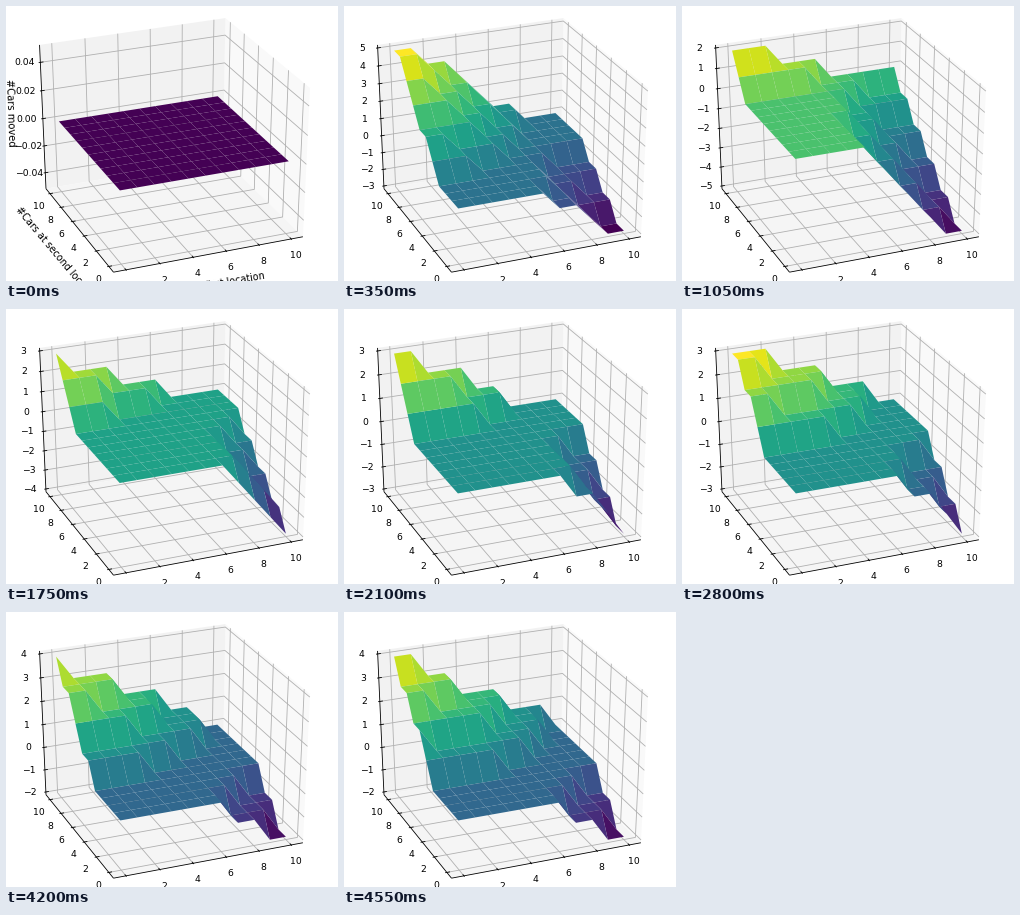
Write a matplotlib script that moves like this. It is 332 px wide and 275 px high and loops after 4.9 s.

```python
import numpy as np
import matplotlib.pyplot as plt
from matplotlib.animation import FuncAnimation
from matplotlib.collections import LineCollection, PolyCollection

W, H, DPI = 332, 275, 100
STEPS, CARS, MAX_MOVE = 14, 10, 5
AZIM, ELEV = np.radians(-112), np.radians(29.5)
CENTER, SCALE, DIST = (165.3, 134.9), (194.2, 161.2), 10
PAD = 0.5 + 1 / 48
OUT, IN = -PAD - 0.009, -PAD + 0.017

sa, ca, se, ce = np.sin(AZIM), np.cos(AZIM), np.sin(ELEV), np.cos(ELEV)
RIGHT = np.array([-sa, ca, 0])
UP = np.array([-se * ca, -se * sa, ce])
TOWARD = np.array([ce * ca, ce * sa, se])

plt.rcParams["font.family"] = "DejaVu Sans"
fig = plt.figure(figsize=(W / DPI, H / DPI), dpi=DPI, facecolor="white")
ax = fig.add_axes([0, 0, 1, 1])


def project(points):
    """Pixel positions and depth of points in the unit box around 0."""
    p = np.asarray(points, float)
    depth = p @ TOWARD
    zoom = 1 / (1 - depth / DIST)
    px = CENTER[0] + SCALE[0] * (p @ RIGHT) * zoom
    py = CENTER[1] - SCALE[1] * (p @ UP) * zoom
    return np.stack([px, py], -1), depth


def car_unit(v):
    return (v - CARS / 2) / (1.1 * CARS)


def terrace(peak, dx, dy):
    """Whole-number steps falling away from a corner in elliptic rings."""
    return np.clip(np.floor(peak - np.hypot(dx, dy) + 1e-9), 0, MAX_MOVE)


def moves(step):
    """Cars to move for every (second, first) pair after a policy update."""
    y, x = np.mgrid[0:CARS + 1, 0:CARS + 1]
    keys = [0, 1, 3, 5, 8, 10, 13]
    gain = np.interp(step, keys, [0, 6.1, 2.95, 3.25, 3.965, 4.03, 4.38])
    loss = np.interp(step, keys, [0, 3.9, 5.9, 4, 3.05, 2.6, 2.6])
    gain_x = np.interp(step, [1, 3], [0.7, 0.37])
    gain_y = np.interp(step, [1, 3, 5, 8, 13], [0.8, 1.1, 1, 0.64, 0.59])
    loss_x = np.interp(step, [1, 5, 8, 10], [0.7, 1, 0.65, 0.5])
    return (terrace(gain, gain_x * x, gain_y * (CARS - y))
            - terrace(loss, loss_x * (CARS - x), 0.5 * y))


def lines(paths, color):
    ax.add_collection(LineCollection([project(p)[0] for p in paths],
                                     colors=color, linewidths=0.6))


def label(x, y, s, size=6.7, angle=0):
    ax.text(x, y, s, size=size, rotation=angle, ha="center", va="center")


def tick_labels(points, texts, dx, dy):
    for (x, y), s in zip(project(points)[0], texts):
        label(x + dx, y + dy, s)


def draw_box(zticks, ztexts):
    a, b = -PAD, PAD
    panes = [[(b, a, a), (b, b, a), (b, b, b), (b, a, b)],
             [(a, b, a), (b, b, a), (b, b, b), (a, b, b)],
             [(a, a, a), (b, a, a), (b, b, a), (a, b, a)]]
    ax.add_collection(PolyCollection([project(p)[0] for p in panes],
                                     facecolors=["0.975", "0.95", "0.9625"],
                                     edgecolors="none"))
    cars = np.arange(0, CARS + 1, 2)
    ct = car_unit(cars)
    lines([[(t, a, a), (t, b, a), (t, b, b)] for t in ct]
          + [[(a, t, a), (b, t, a), (b, t, b)] for t in ct]
          + [[(a, b, t), (b, b, t), (b, a, t)] for t in zticks], "#b0b0b0")
    lines([[(a, a, a), (b, a, a)], [(a, a, a), (a, b, a)],
           [(a, b, a), (a, b, b)]]
          + [[(t, OUT, a), (t, IN, a)] for t in ct]
          + [[(OUT, t, a), (IN, t, a)] for t in ct]
          + [[(OUT, b, t), (IN, b, t)] for t in zticks], "black")
    tick_labels([(t, a, a) for t in ct], cars, 4.3, 16.5)
    tick_labels([(a, t, a) for t in ct], cars, -11, 12.8)
    tick_labels([(a, b, t) for t in zticks], ztexts, -16, 0.5)


def draw_surface(z):
    c = car_unit(np.arange(CARS + 1))
    x, y = np.meshgrid(c, c)
    grid = np.stack([x, y, z], -1)
    quads = np.stack([grid[:-1, :-1], grid[:-1, 1:],
                      grid[1:, 1:], grid[1:, :-1]], 2).reshape(-1, 4, 3)
    pts, depth = project(quads)
    level = (quads[..., 2].mean(1) - z.min()) / (np.ptp(z) or 1)
    order = np.argsort(depth.mean(1), kind="stable")
    ax.add_collection(PolyCollection(pts[order], edgecolors="none", zorder=2,
                                     facecolors=plt.cm.viridis(level[order])))


def draw(step):
    ax.clear()
    ax.set(xlim=(0, W), ylim=(H, 0))
    ax.axis("off")
    z = moves(step)
    lo, hi = z.min(), z.max()
    if lo == hi:
        lo, hi = -0.05, 0.05
        ticks, fmt = np.arange(-2, 3) * 0.02, "{:.2f}"
    else:
        ticks, fmt = np.arange(lo, hi + 1), "{:.0f}"

    def unit(v):
        return (v - (lo + hi) / 2) / (hi - lo)

    draw_box(unit(ticks), [fmt.format(t).replace("-", "\u2212") for t in ticks])
    draw_surface(unit(z))
    if step == 0:
        label(207, 279, "#Cars at first location", 6.9, 10)
        label(50, 249, "#Cars at second location", 6.9, -50)
        label(4.5, 107, "#Cars moved", 7.2, -88)


anim = FuncAnimation(fig, draw, frames=STEPS, interval=350, repeat=True)
plt.show()
```
